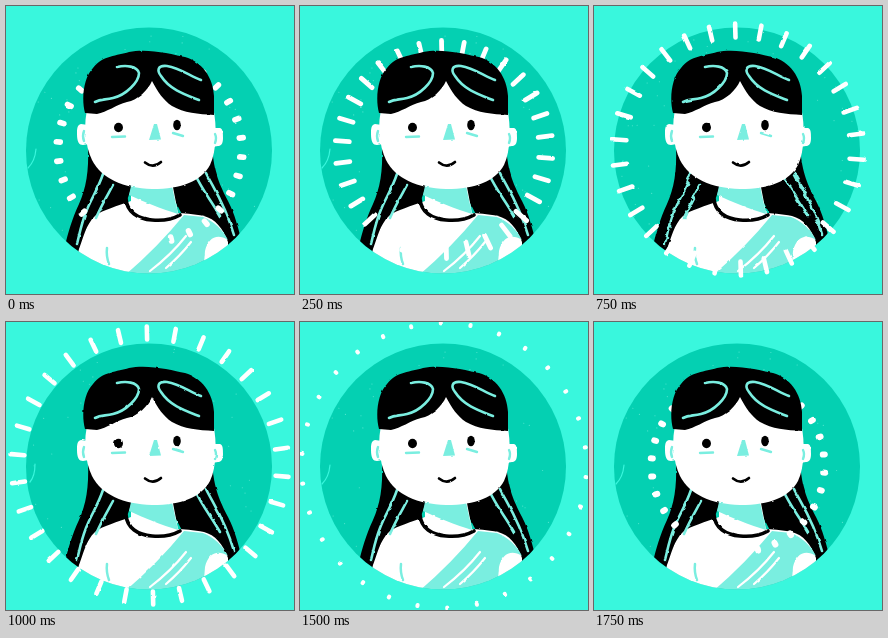
Animation, 288 px wide and 288 px high, one loop 2000 ms. Source, as an HTML page:

```html
<!DOCTYPE html>
<html lang="en">
<head>
<meta charset="utf-8">
<title>Portrait with radiating strokes</title>
<style>
  html, body { margin: 0; width: 100%; height: 100%; overflow: hidden; background: #39f7dd; }
  svg { display: block; width: 100vw; height: 100vh; }
  .ink { fill: none; stroke-linecap: round; stroke-linejoin: round; }
  .mint { stroke: #7aeee0; }
  .black { stroke: #000; }
  .pose0 { animation: pose0 2s step-end infinite; }
  .pose1 { animation: pose1 2s step-end infinite; }
  .pose2 { animation: pose2 2s step-end infinite; }
  .rays { animation: flash 2s step-end infinite; }
  @keyframes pose0 { 0%, 75%, 100% { visibility: visible } 25% { visibility: hidden } }
  @keyframes pose1 { 0%, 50%, 100% { visibility: hidden } 25% { visibility: visible } }
  @keyframes pose2 { 0%, 75%, 100% { visibility: hidden } 50% { visibility: visible } }
  @keyframes flash { 0% { visibility: visible } 12.5%, 100% { visibility: hidden } }
</style>
</head>
<body>
<svg viewBox="0 0 288 288">
  <defs id="defs">
    <clipPath id="disc"><circle cx="143" cy="144.5" r="123"/></clipPath>

    <g id="body">
      <path d="M82 140C83 166 80 182 73 198C66 213 62 227 59 240L73 250L112 220L126 180Z"/>
      <path d="M206 140C208 168 214 179 222 195C229 208 232 222 236 236L222 242L180 216L160 178Z"/>
      <path fill="#fff" d="M125 176V195C112 200 96 204 89 210C80 218 77 233 73 243L66 270H222L222 236C217 222 209 213 198 210C188 208 176 207 172 207L166 176Z"/>
      <path fill="#7aeee0" d="M125 180H166L172 208C156 203 138 196 123 189Z"/>
      <path fill="#7aeee0" d="M178 209L197 211C208 215 217 224 222 234C211 227 202 232 199 245L197 270H118Q151 242 178 209Z"/>
      <g class="ink">
        <path stroke="#fff" stroke-width="2.2" d="M180 230Q165 249 144 265M185 236Q174 250 160 262"/>
        <path class="mint" stroke-width="2.5" d="M101 242Q100 250 103 258"/>
        <path class="black" stroke-width="3.6" d="M120 193C121 206 132 213 146 214C157 215 167 213 174 209"/>
      </g>
    </g>

    <g id="strands" class="ink mint" stroke-width="2.6">
      <path d="M97 168C92 183 85 193 80 206S74 226 71 238M107 179C101 190 95 200 90 212"/>
      <path d="M189 168C196 184 205 194 214 210M200 167C206 180 218 195 228 229"/>
    </g>

    <g id="head">
      <path fill="#fff" d="M82 101C77 116 79 140 86 154C96 173 117 182 146 183C176 183 195 175 204 159C211 144 211 119 207 101L146 66Z"/>
      <path fill="#fff" d="M82 119L75 118C71 119 71 123 71 128C71 136 73 139 77 139L83 138ZM207 122L214 122C217 123 217 127 217 132C217 138 215 140 212 140L206 141Z"/>
      <path d="M79 107C75 92 78 71 87 62C97 49 111 50 123 46C141 42 166 48 179 51C196 56 207 71 208 90L208 109C192 108 178 107 166 100C157 94 152 86 146 75C142 84 132 94 121 96C110 99 101 106 91 108Z"/>
      <g class="ink">
        <path class="mint" stroke-width="2.6" d="M111 61C120 59 131 60 133 67C133 76 120 89 107 92C99 94 95 93 89 96M195 74C184 70 174 62 161 60C151 59 151 65 155 70C164 84 180 89 193 94"/>
        <path class="mint" stroke-width="2.4" d="M106 131L119 130.5M167 127L177 130M78 125Q76 130 78 135M209 128Q211 132 209 137"/>
        <path class="black" stroke-width="2.6" d="M139 156.5Q147 163 155 156"/>
      </g>
      <path fill="#7aeee0" d="M148 118H151L155 133.5L143 134Z"/>
      <ellipse cx="112.5" cy="121.5" rx="4.5" ry="4.7"/>
      <ellipse cx="171" cy="119" rx="3.8" ry="5.2"/>
    </g>
  </defs>

  <rect width="288" height="288" fill="#39f7dd"/>
  <circle cx="143" cy="144.5" r="123" fill="#04d0b2"/>
  <g id="back" clip-path="url(#disc)"></g>
  <g id="burst" class="ink" stroke="#fff"></g>
  <g id="front"></g>
</svg>
<script>
  const get = id => document.getElementById(id);
  const add = (id, markup) => get(id).insertAdjacentHTML('beforeend', markup);

  function random(seed) {
    return () => (seed = (seed * 16807) % 2147483647) / 2147483647;
  }

  const rough = (id, seed, scale) => `
    <filter id="${id}" filterUnits="userSpaceOnUse" x="0" y="0" width="288" height="288" color-interpolation-filters="sRGB">
      <feTurbulence type="fractalNoise" baseFrequency=".13" numOctaves="2" seed="${seed}"/>
      <feDisplacementMap in="SourceGraphic" scale="${scale}" xChannelSelector="R" yChannelSelector="G"/>
    </filter>`;

  function specks(seed) {
    const rnd = random(seed);
    let d = '';
    for (let i = 0; i < 75; i++) {
      const a = rnd() * Math.PI * 2, r = 121 * Math.sqrt(rnd());
      d += `M${(143 + r * Math.cos(a)).toFixed(1)} ${(144.5 + r * Math.sin(a)).toFixed(1)}h.1`;
    }
    return d;
  }

  const scratches = ['M30 143Q29 155 22 162', 'M25 160L29 155', 'M29 142Q29 154 24 160'];

  scratches.forEach((scratch, i) => {
    add('defs', rough('edge' + i, 4 + i * 7, 2) + rough('wave' + i, 9 + i * 5, i === 1 ? 7 : 2.5));
    add('back', `<g class="pose${i}">
      <path class="ink" stroke="#4be3cc" stroke-width="1.1" d="${specks(811 + i * 977)}"/>
      <path class="ink" stroke="#39f7dd" stroke-width="1.2" d="${scratch}"/>
      <use href="#body" filter="url(#edge${i})"/>
      <use href="#strands" filter="url(#wave${i})"/>
    </g>`);
    add('front', `<g class="pose${i}"><use href="#head" filter="url(#edge${i})"/></g>`);
  });

  // inner radius, outer radius, line width for each 250 ms step
  const steps = [
    [90, 94, 5.6], [95, 109, 4.8], [104, 118, 4.6], [112, 126, 4.6],
    [126, 139, 4.6], [139, 141, 6], [142, 143, 4], [85.5, 87.5, 6]
  ];

  function spokes(from, to) {
    let d = '';
    for (let k = 0; k < 30; k++) {
      const a = (k * 12 - 1.3) * Math.PI / 180;
      const at = r => `${(144 + r * Math.sin(a)).toFixed(1)} ${(143.5 - r * Math.cos(a)).toFixed(1)}`;
      d += `M${at(from)}L${at(to)}`;
    }
    return d;
  }

  steps.forEach(([from, to, width], i) => {
    const pose = (i >> 1) % 3;
    add('burst', `<g class="rays" style="animation-delay:${i * 250 - 2000}ms">
      <path d="${spokes(from, to)}" stroke-width="${width}" filter="url(#edge${pose})"/></g>`);
  });
</script>
</body>
</html>
```
